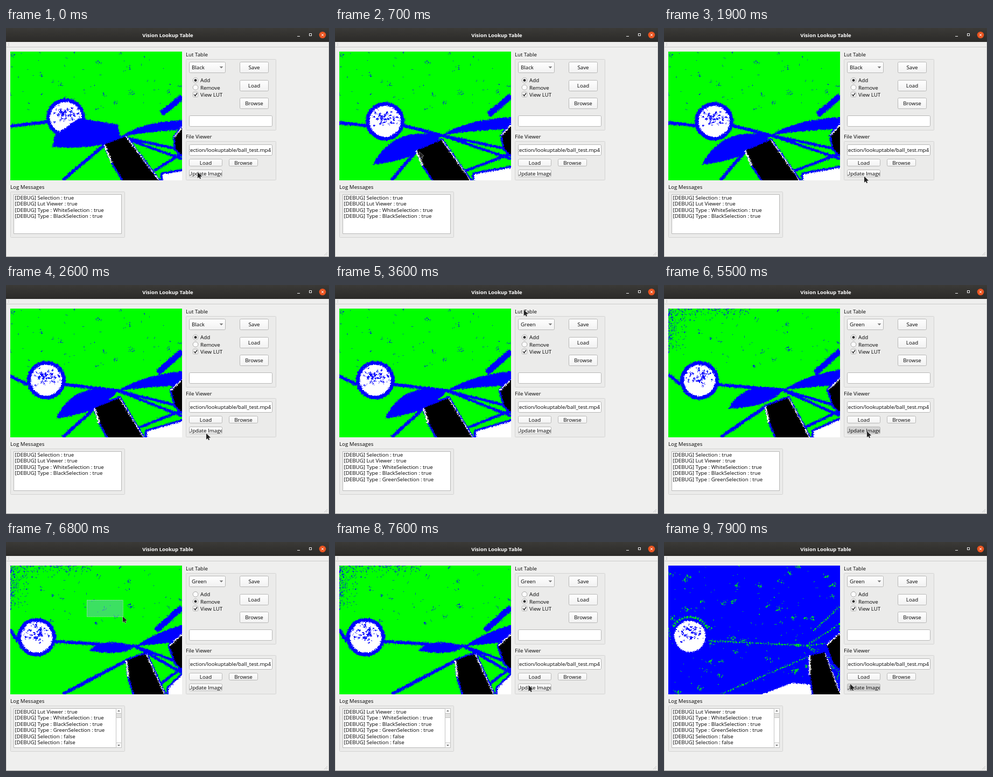
Recreate the animation shown at these times as an HTML page with a canvas. Size 600 px wide and 427 px high, loop 8000 ms.

```html
<!DOCTYPE html>
<html lang="en">
<head>
<meta charset="utf-8">
<title>Vision Lookup Table</title>
<style>
html, body { margin: 0; width: 100%; height: 100%; overflow: hidden; background: #efefee; }
canvas { display: block; }
</style>
</head>
<body>
<canvas id="stage" width="600" height="427"></canvas>
<script>
const ctx = document.getElementById('stage').getContext('2d');
const LOOP = 8000, STEP = 100;
const LEFT = 8, TOP = 44, RIGHT = 327, BOTTOM = 284;
const GREEN = '#0f0', BLUE = '#00f', WHITE = '#fff', BLACK = '#000';

// Each click on the update button shows the next picture one step later
const clicks = [100, 500, 2100, 2400, 5400, 5700, 7800];
const greenChosen = 3500, removeChosen = 6300;

// Pointer moves: start, end, x, y, and whether it drags a selection
const moves = [
  [-1, 0, 356, 269], [500, 700, 157, 231], [900, 1600, 210, 262, true], [1700, 1900, 372, 277],
  [2600, 2900, 398, 75], [3000, 3300, 385, 40], [3500, 3900, 166, 81], [3900, 4400, 247, 133, true],
  [4400, 4900, 340, 291], [4900, 5300, 377, 273], [5800, 6100, 357, 109], [6300, 6500, 150, 108],
  [6500, 6800, 217, 139, true], [6900, 7300, 433, 280], [7300, 7700, 346, 265]
];

function seeded(seed) {
  return () => {
    seed = (seed + 0x6D2B79F5) | 0;
    let n = Math.imul(seed ^ (seed >>> 15), 1 | seed);
    n = (n + Math.imul(n ^ (n >>> 7), 61 | n)) ^ n;
    return ((n ^ (n >>> 14)) >>> 0) / 4294967296;
  };
}

function path(c, points) {
  c.beginPath();
  points.forEach(([x, y]) => c.lineTo(x, y));
}

// ---- Classified camera picture; p runs from 0 to 1 as the camera pans ----
function renderPicture(p, inverted) {
  const canvas = document.createElement('canvas');
  const w = canvas.width = RIGHT - LEFT, h = canvas.height = BOTTOM - TOP;
  const c = canvas.getContext('2d');
  const random = seeded(7), spread = () => random() + random() - 1;
  const mark = inverted ? GREEN : BLUE;

  // Parabola through a start, middle and end value
  const bend = (a, m, b) => a + (4 * m - 3 * a - b) * p + 2 * (a + b - 2 * m) * p * p;
  const ball = [111 - 63 * p, bend(167, 177, 176)], r = 35;
  const tip = [bend(86, 84, 200), bend(222, 254, 165)];
  const head = [bend(212, 203, 265), 203 - 10 * p];
  const leg = [
    [bend(184, 158, 272), bend(217, 230, 212)], [bend(222, 204, 298), bend(203, 211, 206)],
    [bend(283, 250, 327), BOTTOM], [bend(218, 184, 278), BOTTOM]
  ];
  const knee = [(leg[0][0] + leg[3][0]) / 2 - 3, (leg[0][1] + BOTTOM) / 2];

  const dot = (x, y, size = 1) => c.fillRect(Math.round(x), Math.round(y), size, size);
  const line = (width, color, ...points) => {
    path(c, points);
    c.lineWidth = width;
    c.strokeStyle = color;
    c.stroke();
  };
  const area = (points, color, border) => {
    path(c, points);
    c.closePath();
    if (border) { c.lineWidth = border; c.strokeStyle = BLUE; c.stroke(); }
    c.fillStyle = color;
    c.fill();
  };
  const disc = (radius, color) => {
    c.beginPath();
    c.arc(...ball, radius, 0, 7);
    c.fillStyle = color;
    c.fill();
  };

  c.translate(-LEFT, -TOP);
  c.lineJoin = 'round';
  c.fillStyle = inverted ? BLUE : GREEN;
  c.fillRect(LEFT, TOP, w, h);

  // Misclassified specks on the field
  c.fillStyle = mark;
  const depth = inverted ? h : 110;
  for (let i = 0; i < (inverted ? 45 : 16); i++) {
    const x = LEFT + random() * w, y = TOP + random() * depth;
    for (let k = 0; k < 9; k++) dot(x + spread() * 6, y + spread() * 5, inverted ? 1 + random() : 1);
    for (let k = 0; k < 5; k++) dot(LEFT + random() * w, TOP + random() * depth);
  }
  if (p > 0.6 && !inverted) for (let i = 0; i < 250; i++) {
    const fade = random() ** 3;
    dot(LEFT + random() * 150, TOP + fade * 22);
    dot(LEFT + fade * 32, TOP + random() * 75);
  }

  // Field lines
  if (inverted) c.setLineDash([3, 2]);
  const thick = width => inverted ? 2 : width;
  line(thick(6), mark, [LEFT, 183 - 23 * p], [ball[0] - r, ball[1] + 8]);
  line(thick(6), mark, [ball[0] + r, ball[1] + 8], head);
  line(thick(11), mark, [RIGHT, 129 - 9 * p], [289 - 12 * p, 160 + 6 * p]);
  line(thick(6), mark, leg[0], [105, BOTTOM]);
  for (const y of [227, 244]) line(thick(5), mark, head, [RIGHT, y]);
  line(thick(5), mark, [RIGHT, 234], [leg[2][0] - 8, 266]);

  // Shadow on the left and field line crossing on the right
  const dx = head[0] - tip[0];
  c.beginPath();
  if (!inverted) {
    c.moveTo(...tip);
    c.quadraticCurveTo(tip[0] + dx * 0.28, head[1] - 18, ...head);
    c.quadraticCurveTo(tip[0] + dx * 0.75, (tip[1] + head[1]) / 2 + 15, ...tip);
  }
  c.moveTo(...head);
  c.quadraticCurveTo(head[0] + 42, 174 - 8 * p, RIGHT, 172 - 20 * p);
  c.lineTo(RIGHT, 190 - 5 * p);
  c.quadraticCurveTo(head[0] + 57, 192 - 4 * p, ...head);
  if (inverted) c.stroke();
  else { c.fillStyle = BLUE; c.fill(); }
  const drawBall = () => {
    disc(r + 1, BLUE);
    disc(r - 6, WHITE);
    c.fillStyle = BLUE;
    for (let i = 0; i < 70; i++) dot(ball[0] + spread() * r * 0.8, ball[1] - 8 + spread() * 20, 1 + random() * 2.5);
  };
  drawBall();
  if (inverted) {
    c.beginPath();
    c.arc(...ball, r + 1, 3.7, 5.9);
    c.lineWidth = 4;
    c.stroke();
  }
  c.setLineDash([]);
  if (p < 0.2) area([tip, [tip[0] + 4, 200], [136 - 60 * p, 168 + 90 * p], [208, 180 + 40 * p], head], BLUE);

  // Robot parts and the white corner
  if (inverted) area([[182, BOTTOM], [238, 263], [280, 266], [280, BOTTOM]], WHITE);
  else area([[leg[2][0] + 8, BOTTOM], [leg[2][0] + 8, 273], [RIGHT, 267 - 22 * p], [RIGHT, BOTTOM]], WHITE, 8);
  const arm = [[RIGHT, 185 - 15 * p], [313 - 11 * p, 203 - 11 * p], [315, 226], [RIGHT, 237]];
  area(arm, BLACK, 6);
  const outline = [leg[0], leg[1], leg[2], leg[3], knee];
  area(outline, BLACK, 7);
  line(6, WHITE, leg[0], knee);
  line(3, WHITE, leg[1], leg[2]);
  line(2, WHITE, arm[0], arm[1]);
  area(outline, BLACK);

  // Push every pixel a little aside for ragged edges, then classify it
  const source = c.getImageData(0, 0, w, h), result = c.createImageData(w, h);
  const nudge = (v, max) => Math.max(0, Math.min(max, v + Math.round(spread() * 1.9)));
  for (let y = 0; y < h; y++) for (let x = 0; x < w; x++) {
    const from = (nudge(y, h - 1) * w + nudge(x, w - 1)) * 4;
    const [red, green, blue] = source.data.subarray(from, from + 3);
    const color = red > 127 ? [255, 255, 255]
      : Math.max(green, blue) < 90 ? [0, 0, 0]
      : green > blue ? [0, 255, 0] : [0, 0, 255];
    result.data.set([...color, 255], (y * w + x) * 4);
  }
  c.putImageData(result, 0, 0);
  return canvas;
}

const pictures = Array.from({ length: clicks.length + 1 },
  (_, i) => renderPicture(i / clicks.length, i === clicks.length));

// ---- Widgets ----
function box(x, y, w, h, fill, border, radius = 0) {
  ctx.beginPath();
  ctx.roundRect(x + 0.5, y + 0.5, w - 1, h - 1, radius);
  ctx.fillStyle = fill;
  ctx.fill();
  ctx.lineWidth = 1;
  ctx.strokeStyle = border;
  ctx.stroke();
}

function text(string, x, y, align = 'left', color = '#000', font = '500 9.75px') {
  ctx.font = `${font} "Open Sans", sans-serif`;
  ctx.textAlign = align;
  ctx.fillStyle = color;
  ctx.fillText(string, x, y);
}

function clipped(x, y, w, h, paint) {
  ctx.save();
  ctx.beginPath();
  ctx.rect(x, y, w, h);
  ctx.clip();
  paint();
  ctx.restore();
}

function raised(x, y, w, h, pressed) {
  const shade = ctx.createLinearGradient(0, y, 0, y + h);
  shade.addColorStop(0, pressed ? '#d2d2d2' : '#ffffff');
  shade.addColorStop(1, pressed ? '#d8d8d8' : '#f1f1f1');
  box(x, y, w, h, shade, '#b7b7b6', 2);
}

function button(label, x, y, w, h, pressed) {
  raised(x, y, w, h, pressed);
  clipped(x + 1, y, w - 2, h, () => text(label, x + w / 2, y + h / 2 + 3.5, 'center'));
}

function group(label, x, y, w, h) {
  text(label, x, y - 5);
  box(x, y, w, h, '#ebebea', '#d3d3d2', 1);
}

function circle(x, y, r, fill, border) {
  ctx.beginPath();
  ctx.arc(x, y, r, 0, 7);
  ctx.fillStyle = fill;
  ctx.fill();
  if (border) { ctx.lineWidth = 1; ctx.strokeStyle = border; ctx.stroke(); }
}

function radio(label, y, on) {
  circle(352, y, 4.8, WHITE, '#a9a9a8');
  if (on) circle(352, y, 2.5, '#333');
  text(label, 361, y + 3.7);
}

function stroke(points, color, width = 1) {
  path(ctx, points);
  ctx.strokeStyle = color;
  ctx.lineWidth = width;
  ctx.stroke();
}

function triangle(x, y, size, color) {
  const half = Math.abs(size);
  path(ctx, [[x - half, y - size / 2], [x + half, y - size / 2], [x, y + size / 2]]);
  ctx.fillStyle = color;
  ctx.fill();
}

function drawWindow() {
  ctx.fillStyle = '#efefee';
  ctx.fillRect(0, 0, 600, 427);
  const shade = ctx.createLinearGradient(0, 0, 0, 26);
  shade.addColorStop(0, '#3b3a37');
  shade.addColorStop(1, '#2b2a28');
  ctx.fillStyle = shade;
  ctx.fillRect(0, 0, 600, 26);
  text('Vision Lookup Table', 300.5, 16.5, 'center', '#fff', 'bold 9.55px');
  stroke([[541, 15.5], [546, 15.5]], '#eee');
  ctx.strokeRect(563.5, 10.5, 4, 4);
  circle(588, 13, 6.3, '#e95420');
  for (const s of [-2.2, 2.2]) stroke([[588 - s, 10.8], [588 + s, 15.2]], '#fff');
  stroke([[0, 35.5], [600, 35.5]], '#cbcbca');
  for (let y = 28; y < 34; y += 2) stroke([[4, y + 0.5], [6, y + 0.5]], '#cfcfce');
  for (const x of [0.5, 599.5]) stroke([[x, 26], [x, 427]], '#c6c6c4');
  stroke([[0, 426.5], [600, 426.5]], '#999');
  for (let i = 0; i < 9; i += 3) stroke([[591 + i, 424], [597, 418 + i]], '#c9c9c8');
}

function drawControls(t) {
  group('Lut Table', 334, 58, 168, 133);
  raised(340, 63, 68, 21);
  text(t < greenChosen ? 'Black' : 'Green', 345, 77);
  triangle(400, 73.5, 3.4, '#777');
  ['Save', 'Load', 'Browse'].forEach((label, i) => button(label, 434, Math.round(63 + i * 33.5), 54, 21));
  radio('Add', 97.5, t < removeChosen);
  radio('Remove', 110.8, t >= removeChosen);
  box(347, 119, 10, 10, WHITE, '#a9a9a8', 1);
  stroke([[349.3, 124], [351.5, 126.5], [355, 121.3]], '#222', 1.5);
  text('View LUT', 361, 127.7);
  box(340, 163, 155, 21, WHITE, '#b7b7b6', 2);

  group('File Viewer', 334, 211, 168, 73);
  box(340, 217, 155, 21, WHITE, '#b7b7b6', 2);
  clipped(341, 218, 153, 19, () => text('detection/lookuptable/ball_test.mp4', 492, 231, 'right'));
  button('Load', 340, 244, 62, 14);
  button('Browse', 414, 244, 54, 14);
  button('Update Image', 340, 264, 62, 14, clicks.some(click => t >= click && t < click + 2 * STEP));
}

function drawLog(t) {
  const lines = ['Selection : true', 'Lut Viewer : true',
    'Type : WhiteSelection : true', 'Type : BlackSelection : true'];
  if (t >= greenChosen) lines.push('Type : GreenSelection : true');
  if (t >= removeChosen) lines.push('Selection : false', 'Selection : false');
  group('Log Messages', 8, 305, 213, 86);
  box(14, 310, 201, 74, WHITE, '#b7b7b6');
  lines.slice(-6).forEach((line, i) => text('[DEBUG] ' + line, 16.5, 320 + i * 11.4));
  if (lines.length > 6) {
    box(204, 310, 11, 74, WHITE, '#c2c2c1');
    box(204, 319, 11, 9, '#e2e2e1', '#c2c2c1');
    box(204, 374, 11, 10, '#fafafa', '#c2c2c1');
    triangle(209.5, 314.8, -2.5, '#666');
    triangle(209.5, 379.2, 2.5, '#666');
  }
}

function drawPopup() {
  box(340, 30, 69, 74, '#fafafa', '#b0b0af', 1);
  ['Green', 'White', 'Black', 'Blue'].forEach((name, i) => text(name, 345, 43 + i * 17.5));
}

function drawSelection(left, top, w, h) {
  ctx.fillStyle = 'rgba(125, 190, 205, 0.48)';
  ctx.fillRect(left, top, w, h);
  ctx.setLineDash([2, 1]);
  ctx.lineWidth = 1;
  ctx.strokeStyle = 'rgba(190, 225, 200, 0.75)';
  ctx.strokeRect(left + 0.5, top + 0.5, w, h);
  ctx.setLineDash([]);
}

function drawPointer(t) {
  const i = moves.findLastIndex(move => move[0] <= t);
  const [start, end, toX, toY, drags] = moves[i];
  const [, , fromX, fromY] = moves[Math.max(0, i - 1)];
  const k = Math.min(1, (t - start) / (end - start)), ease = k * k * (3 - 2 * k);
  const dx = (toX - fromX) * ease, dy = (toY - fromY) * ease;
  // A finished selection stays until the next step
  const done = moves[i - 1];
  if (drags && t <= end) drawSelection(fromX, fromY, Math.round(dx), Math.round(dy));
  else if (done?.[4] && t === done[1]) {
    const [, , x, y] = moves[i - 2];
    drawSelection(x, y, done[2] - x, done[3] - y);
  }

  ctx.save();
  ctx.translate(fromX + dx, fromY + dy);
  path(ctx, [[0, 0], [0, 11], [2.6, 8.8], [4.3, 12.3], [6, 11.4], [4.5, 8], [8, 7.6]]);
  ctx.closePath();
  ctx.lineWidth = 1;
  ctx.strokeStyle = '#ddd';
  ctx.stroke();
  ctx.fillStyle = '#222';
  ctx.fill();
  ctx.restore();
}

function draw(now) {
  const t = Math.floor((now % LOOP) / STEP) * STEP;
  drawWindow();
  drawControls(t);
  drawLog(t);
  ctx.drawImage(pictures[clicks.filter(click => t >= click + STEP).length], LEFT, TOP);
  if (t >= 3000 && t < greenChosen) drawPopup();
  drawPointer(t);
}

let start;
function tick(now) {
  start ??= now;
  draw(now - start);
  requestAnimationFrame(tick);
}
requestAnimationFrame(tick);
</script>
</body>
</html>
```
